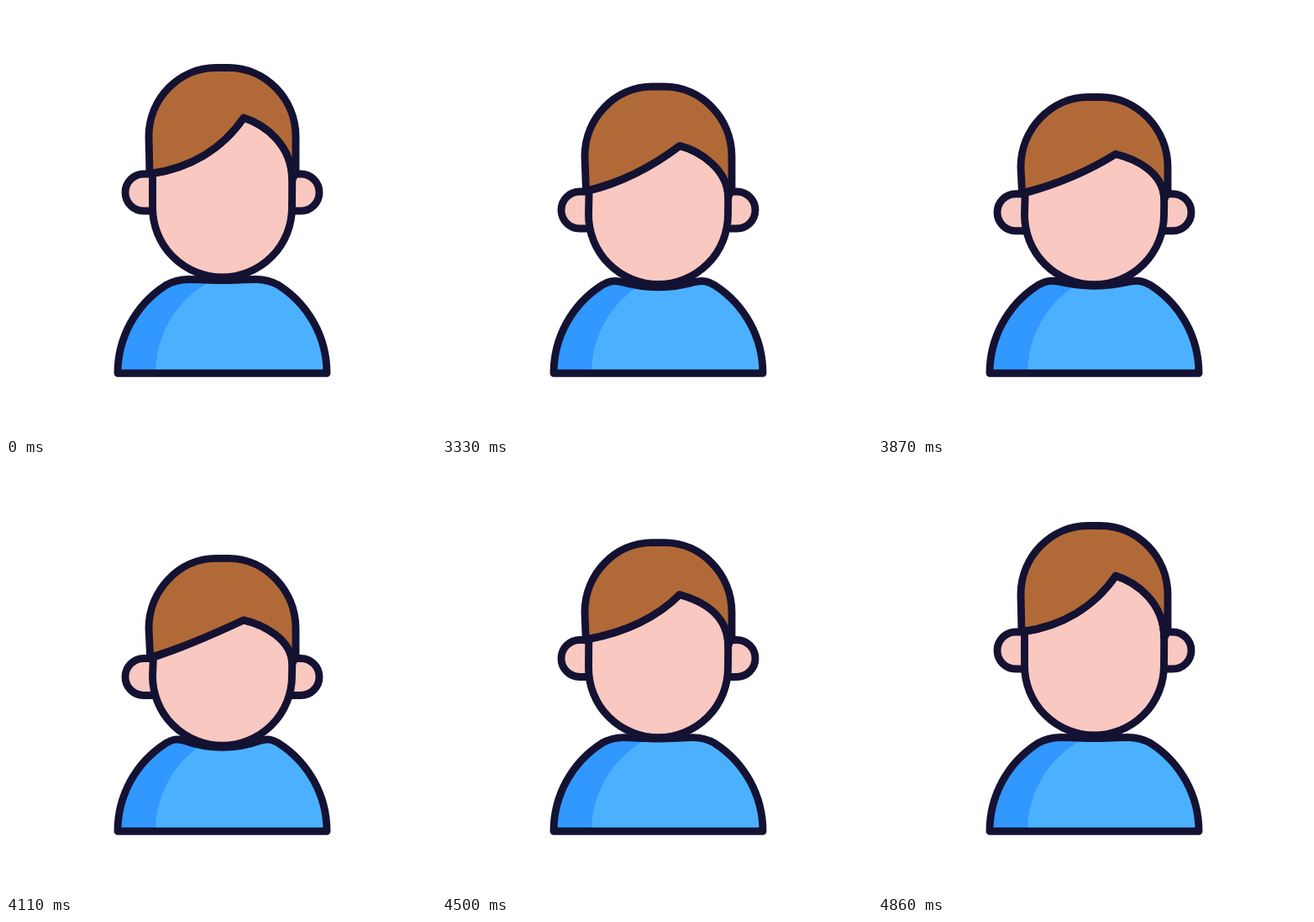
Animation of 512 by 512 pixels, one loop 5100 ms. Source, as an HTML page with a canvas:

```html
<!DOCTYPE html>
<html lang="en">
<head>
<meta charset="utf-8">
<title>Nodding figure</title>
<style>
html, body { margin: 0; width: 100%; height: 100%; overflow: hidden; background: #fff; }
canvas { display: block; width: 512px; height: 512px; }
</style>
</head>
<body>
<canvas id="stage" width="512" height="512"></canvas>
<script>
const ctx = document.getElementById('stage').getContext('2d');
const LOOP = 5100, STEP = 30, MID = 257.5;
const INK = '#141233', HAIR = '#b16a37', SKIN = '#f8c8c1', LIGHT = '#4bb1fe', DARK = '#3098fe';

// Two nods: lift, down, halfway up, down, overshoot, settle.
const TIMES = [3000, 3060, 3580, 3940, 4305, 4610, 4835];
const LOW = [0, -0.1, 1, 0.5, 1, -0.1, 0];
const FRINGE = [0, -0.09, 1, 0.51, 1, -0.09, 0];
const CROWN = [0, -0.065, 1, 0.57, 1, -0.09, 0];

const mix = (a, b, k) => a + (b - a) * k;

function nod(t, values) {
  if (t <= TIMES[0]) return values[0];
  for (let i = 1; i < TIMES.length; i++) {
    if (t < TIMES[i]) {
      const u = (t - TIMES[i - 1]) / (TIMES[i] - TIMES[i - 1]);
      return mix(values[i - 1], values[i], 0.5 - 0.5 * Math.cos(Math.PI * u));
    }
  }
  return 0;
}

function paint(path, fill) {
  ctx.fillStyle = fill;
  ctx.fill(path);
  ctx.stroke(path);
}

function drawBody(k) {
  const p = new Path2D();
  const neckX = mix(217, 210, k), neckY = mix(325.5, 330, k), dip = mix(326.5, 340, k);
  const c1 = [mix(206, 203, k), mix(325.5, 327.3, k)];
  const c2 = [mix(230, 226, k), mix(325.5, 337, k)];
  const c3 = mix(243, 240, k);
  const m = x => 2 * MID - x;
  p.moveTo(133, 437.3);
  p.arc(MID, 437.3, 124.5, Math.PI, Math.PI + Math.acos(67.5 / 124.5));
  p.bezierCurveTo(199, 327.5, ...c1, neckX, neckY);
  p.bezierCurveTo(...c2, c3, dip, MID, dip);
  p.bezierCurveTo(m(c3), dip, m(c2[0]), c2[1], m(neckX), neckY);
  p.bezierCurveTo(m(c1[0]), c1[1], m(199), 327.5, 325, 332.7);
  p.arc(MID, 437.3, 124.5, -Math.acos(67.5 / 124.5), 0);
  p.closePath();
  ctx.fillStyle = DARK;
  ctx.fill(p);
  ctx.save();
  ctx.clip(p);
  ctx.beginPath();
  ctx.arc(302, 437, 124, 0, 2 * Math.PI);
  ctx.fillStyle = LIGHT;
  ctx.fill();
  ctx.restore();
  ctx.stroke(p);
}

function drawEar(side, y) {
  const x = MID + side * 93.5, inner = MID + side * 76;
  const p = new Path2D();
  p.moveTo(inner, y - 22);
  p.lineTo(x, y - 22);
  p.arc(x, y, 22, -Math.PI / 2, Math.PI / 2, side < 0);
  p.lineTo(inner, y + 22);
  paint(p, SKIN);
}

function drawHead(low, fringe, crown, chin) {
  const top = 73.5 + 54.5 * crown;
  const side = top + 82 + 2 * crown;
  const peak = 133 + 75.5 * fringe;
  const endL = 199.5 + 42.5 * low, endR = 207 + 43 * low;
  const jaw = 240 + 16.5 * chin;

  // Right half of the fringe, then the left half, ending at x.
  const hairline = (p, x) => {
    p.lineTo(340.7, endR);
    p.bezierCurveTo(340.7, mix(165, 226, low),
      mix(308, 306, low), mix(141, 212.5, fringe), 283, peak);
    p.bezierCurveTo(mix(257, 245, low), mix(171, 215.5, fringe),
      mix(218, 207, low), mix(193, 229, low), x, endL);
  };

  const face = new Path2D();
  face.moveTo(340.5, jaw);
  hairline(face, 174.5 + 1.2 * low);
  face.lineTo(174.5, jaw);
  face.arc(MID, jaw, 83, Math.PI, 0, true);
  face.closePath();
  paint(face, SKIN);

  const hair = new Path2D();
  hair.moveTo(171 + low, endL);
  hair.lineTo(170, side);
  hair.bezierCurveTo(170, side - 45, 206, top, 250, top);
  hair.lineTo(265, top);
  hair.bezierCurveTo(309, top, 345, side - 45, 345, side);
  hair.lineTo(345, 198 + 42 * low);
  hairline(hair, 172);
  hair.closePath();
  paint(hair, HAIR);
}

function draw(t) {
  ctx.fillStyle = '#fff';
  ctx.fillRect(0, 0, 512, 512);
  ctx.strokeStyle = INK;
  ctx.lineWidth = 8.9;
  ctx.lineJoin = ctx.lineCap = 'round';

  // The chin and collar lead the nod, the hair trails behind.
  const low = nod(t, LOW), chin = nod(t + 10, LOW), collar = nod(t + 40, LOW);
  const fringe = nod(t - 14, FRINGE), crown = nod(t - 27, CROWN);
  drawBody(t < TIMES[0] ? 0 : collar);
  drawEar(-1, 222 + 43.5 * low);
  drawEar(1, 222 + 43.5 * low);
  drawHead(low, fringe, crown, t < TIMES[0] ? 0 : chin);
}

const start = performance.now();
function tick() {
  const t = (performance.now() - start) % LOOP;
  draw(Math.floor(t / STEP) * STEP);
  requestAnimationFrame(tick);
}
tick();
</script>
</body>
</html>
```
